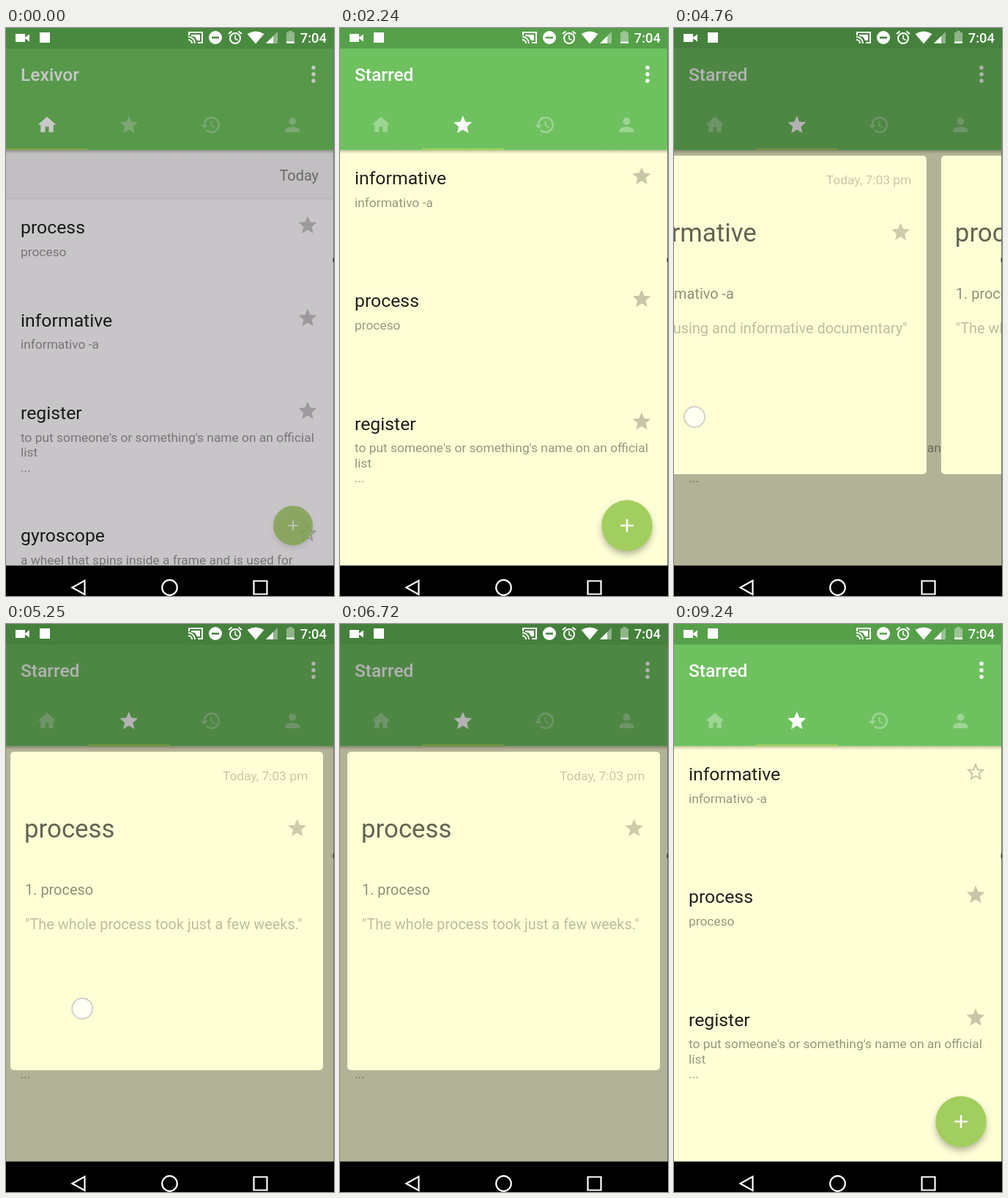
These frames come from a looping animation (448x774 px, 9.31 s). An HTML page with a canvas:

```html
<!DOCTYPE html>
<html lang="en">
<head>
<meta charset="utf-8">
<title>Dictionary app</title>
<style>
  html, body { margin: 0; width: 100%; height: 100%; overflow: hidden; background: #000; }
  canvas { display: block; }
</style>
</head>
<body>
<canvas id="stage" width="448" height="774"></canvas>
<script>
const ctx = document.getElementById('stage').getContext('2d');
const W = 448, LOOP = 9310, DP = 448 / 360, PITCH = 447;
const HEADER_END = 166.5, NAV_TOP = 732.5;
const YELLOW = '#ffffd6';
const start = performance.now();

const ICONS = {
  home: 'M10 20v-6h4v6h5v-8h3L12 3 2 12h3v8z',
  star: 'M12 17.27L18.18 21l-1.64-7.03L22 9.24l-7.19-.61L12 2 9.19 8.63 2 9.24l5.46 4.73L5.82 21z',
  starOutline: 'M22 9.24l-7.19-.62L12 2 9.19 8.63 2 9.24l5.46 4.73L5.82 21 12 17.27 18.18 21l-1.63-7.03zM12 15.4l-3.76 2.27 1-4.28-3.32-2.88 4.38-.38L12 6.1l1.71 4.04 4.38.38-3.32 2.88 1 4.28z',
  history: 'M13 3a9 9 0 0 0-9 9H1l3.89 3.89.07.14L9 12H6a7 7 0 1 1 2.06 4.94l-1.42 1.42A9 9 0 1 0 13 3zm-1 5v5l4.28 2.54.72-1.21-3.5-2.08V8z',
  person: 'M12 12a4 4 0 1 0 0-8 4 4 0 0 0 0 8zm0 2c-2.67 0-8 1.34-8 4v2h16v-2c0-2.66-5.33-4-8-4z'
};
for (const name in ICONS) ICONS[name] = new Path2D(ICONS[name]);

const WORDS = {
  process: {
    gloss: ['proceso'],
    card: [[369, '1. proceso'], [416, '"The whole process took just a few weeks."']]
  },
  informative: {
    gloss: ['informativo -a'],
    card: [[369, '1. informativo -a'], [416, '"an amusing and informative documentary"']]
  },
  register: {
    gloss: ["to put someone's or something's name on an official", 'list', '...'],
    card: [
      [369, "1. to put someone's or something's name on"], [392.5, 'an official list'],
      [439, '"The tanker is registered in Rotterdam."'],
      [504.5, '2. an official list of names of people,'], [528, 'companies etc, or a book that has this'],
      [575, '"Have you signed the hotel register?"']
    ]
  },
  gyroscope: { gloss: ['a wheel that spins inside a frame and is used for'] }
};

const clamp = x => Math.min(1, Math.max(0, x));
const progress = (t, from, to) => clamp((t - from) / (to - from));
const linear = x => x;
const out = x => 1 - (1 - x) ** 3;
const overshoot = x => 1 + (x - 1) ** 2 * (3 * (x - 1) + 2);

// Keys are [time, value, easing into this key].
function track(t, keys) {
  let last = keys[0];
  for (const key of keys) {
    if (t < key[0]) {
      const k = (key[2] || linear)(progress(t, last[0], key[0]));
      return last[1] + (key[1] - last[1]) * k;
    }
    last = key;
  }
  return last[1];
}

const TAB = [[450, 0], [600, .22], [1000, 1, out]];
const PAGER = [
  [4600, 0], [4760, .2], [5150, 1, out], [5230, 1], [5250, 1.007], [5350, 1.2], [5730, 2, out],
  [5890, 2], [6020, 1.738], [6090, 1.6], [6450, 1, out],
  [6800, 1], [6950, .72], [7080, .6], [7500, 0, out]
];
const DIM = [[0, .215], [220, 0], [3345, 0], [3620, .3], [8820, .3], [9100, 0]];
const FAB = [[0, .77], [80, 1, out], [3600, 1], [3808, 0], [8780, 0], [8980, 1, out]];
const TOUCHES = [
  [[3230, 121, 215], [3340, 121, 215]],
  [[4580, 128, 530], [4760, 28, 530]],
  [[5190, 128, 524], [5250, 105, 524], [5350, 28, 524]],
  [[5870, 36, 527], [6020, 173, 527], [6040, 176, 527]],
  [[6780, 36, 527], [6950, 173, 527], [7080, 230, 527]],
  [[8200, 402, 278], [8320, 402, 278]],
  [[8430, 223, 670], [8500, 223, 670]]
];

function text(str, x, y, size, color, { align = 'left', weight = 400 } = {}) {
  ctx.font = `${weight} ${size}px Roboto, sans-serif`;
  ctx.textAlign = align;
  ctx.fillStyle = color;
  ctx.fillText(str, x, y);
}

function rect(x, y, w, h, color) {
  ctx.fillStyle = color;
  ctx.fillRect(x, y, w, h);
}

function circle(x, y, r, color) {
  ctx.beginPath();
  ctx.arc(x, y, r, 0, 7);
  ctx.fillStyle = color;
  ctx.fill();
}

function polygon(points, color) {
  ctx.beginPath();
  points.forEach(p => ctx.lineTo(...p));
  ctx.closePath();
  ctx.fillStyle = color;
  ctx.fill();
}

function stroke(width, draw, color = '#fff') {
  ctx.beginPath();
  draw();
  ctx.strokeStyle = color;
  ctx.lineWidth = width;
  ctx.stroke();
}

function icon(name, x, y, color) {
  ctx.save();
  ctx.translate(x, y);
  ctx.scale(DP, DP);
  ctx.translate(-12, -12);
  ctx.fillStyle = color;
  ctx.fill(ICONS[name], 'evenodd');
  ctx.restore();
}

function shade(y, h, from, to) {
  const g = ctx.createLinearGradient(0, y, 0, y + h);
  g.addColorStop(0, `rgba(0,0,0,${from})`);
  g.addColorStop(1, `rgba(0,0,0,${to})`);
  rect(0, y, W, h, g);
}

function row(word, y, starred) {
  text(word, 20, y, 24.8, 'rgba(0,0,0,.88)');
  WORDS[word].gloss.forEach((line, i) =>
    text(line, 20, y + 30.8 + i * 20.4, 17.38, 'rgba(0,0,0,.41)'));
  icon(starred ? 'star' : 'starOutline', 412, y - 11.5, 'rgba(0,0,0,.22)');
}

function homePage() {
  rect(0, 166, W, 568, '#fffbff');
  rect(0, 166, W, 67, '#f7f3f7');
  shade(229, 5, 0, .06);
  text('Today', 427, 208, 16 * DP, 'rgba(0,0,0,.46)', { align: 'right' });
  row('process', 280, true);
  row('informative', 406.5, true);
  row('register', 533, true);
  row('gyroscope', 700, false);
}

function starredPage(t) {
  rect(0, 166, W, 568, YELLOW);
  row('informative', 213.2, t < 8800);
  row('process', 380.4, true);
  row('register', 547.6, true);
}

function shifted(x, draw) {
  if (Math.abs(x) >= W) return;
  ctx.save();
  ctx.translate(x, 0);
  draw();
  ctx.restore();
}

function header(tab) {
  shade(HEADER_END, 5, .22, 0);
  rect(0, 28, W, HEADER_END - 28, '#6fc160');
  text(tab < .5 ? 'Lexivor' : 'Starred', 20, 72, 24.6, '#fff', { weight: 500 });
  [54, 63, 72].forEach(y => circle(420, y, 2.7, '#fff'));
  ['home', 'star', 'history', 'person'].forEach((name, i) => {
    const alpha = .32 + .68 * clamp(1 - Math.abs(tab - i));
    icon(name, 56 + i * 111.8, 132, `rgba(255,255,255,${alpha})`);
  });
  rect(tab * 112, HEADER_END - 2.5, 112, 2.5, '#a3cf62');
}

function fab(scale) {
  if (scale <= 0) return;
  ctx.save();
  ctx.translate(392, 678);
  ctx.scale(scale, scale);
  ctx.globalAlpha = scale;
  ctx.shadowColor = `rgba(0,0,0,${.28 * scale ** 3})`;
  ctx.shadowBlur = 9 * scale;
  ctx.shadowOffsetY = 5 * scale;
  circle(0, 0, 34.7, '#a2ce5f');
  ctx.shadowColor = 'transparent';
  rect(-8.7, -1.25, 17.4, 2.5, '#fff');
  rect(-1.25, -8.7, 2.5, 17.4, '#fff');
  ctx.restore();
}

function card(word, starred) {
  ctx.beginPath();
  ctx.roundRect(10, 174, 427, 434, 5);
  ctx.fillStyle = YELLOW;
  ctx.fill();
  text('Today, 7:03 pm', 416.5, 213, 14 * DP, 'rgba(0,0,0,.22)', { align: 'right' });
  text(word, 29, 290.6, 28 * DP, 'rgba(0,0,0,.61)');
  icon(starred ? 'star' : 'starOutline', 401.7, 278, 'rgba(0,0,0,.2)');
  for (const [y, line] of WORDS[word].card)
    text(line, 30, y, 16 * DP, line[0] === '"' ? 'rgba(0,0,0,.26)' : 'rgba(0,0,0,.44)');
}

function dialog(t) {
  const scale = t < 6000
    ? overshoot(progress(t, 3345, 3920))
    : overshoot(1 - progress(t, 8500, 8800));
  if (scale <= 0) return;
  const page = track(t, PAGER);
  ctx.save();
  ctx.translate(223.5, 391);
  ctx.scale(scale, scale);
  ctx.translate(-223.5, -391);
  ['informative', 'process', 'register'].forEach((word, i) =>
    shifted((i - page) * PITCH, () => card(word, i > 0 || t < 8340)));
  ctx.restore();
}

function statusIcons(green) {
  const white = '#fff', faint = 'rgba(255,255,255,.4)';
  rect(13, 8, 13, 11, white);
  polygon([[25, 13.5], [32, 8.5], [32, 18.5]], white);
  rect(46, 6, 14, 14, white);

  stroke(2, () => {
    ctx.moveTo(250, 10); ctx.lineTo(250, 6); ctx.lineTo(268, 6);
    ctx.lineTo(268, 20); ctx.lineTo(262, 20);
  });
  [5, 9].forEach(r => stroke(2, () => ctx.arc(249, 21, r, -Math.PI / 2, 0)));
  polygon([[253, 9], [265, 9], [265, 17], [261, 17], [258, 12], [253, 11]], white);

  circle(286, 13, 9, white);
  rect(281, 11.8, 10, 2.6, green);

  stroke(2, () => ctx.arc(313, 14, 7, 0, 7));
  stroke(1.6, () => { ctx.moveTo(313, 9.5); ctx.lineTo(313, 14.5); ctx.lineTo(316.5, 16.5); });
  stroke(2, () => {
    ctx.moveTo(304, 8); ctx.lineTo(308.5, 4.5);
    ctx.moveTo(322, 8); ctx.lineTo(317.5, 4.5);
  });

  ctx.beginPath();
  ctx.moveTo(341, 21.5);
  ctx.lineTo(329.5, 8);
  ctx.quadraticCurveTo(341, 1, 352.5, 8);
  ctx.fillStyle = white;
  ctx.fill();

  polygon([[355, 21], [371, 21], [371, 5]], faint);
  polygon([[355, 21], [365, 21], [365, 11]], white);

  rect(386, 4, 5, 2, faint);
  rect(383, 6, 11, 15, faint);
  rect(383, 18.5, 11, 2.5, white);
  text('7:04', 438, 20.3, 18.4, white, { align: 'right', weight: 500 });
}

function navBar() {
  rect(0, NAV_TOP, W, 42, '#000');
  stroke(2.2, () => {
    ctx.moveTo(90.5, 762.5); ctx.lineTo(107.5, 753); ctx.lineTo(107.5, 772); ctx.closePath();
  });
  stroke(2.2, () => ctx.arc(223.5, 762.5, 10.3, 0, 7));
  stroke(2.2, () => ctx.rect(338.5, 753.5, 18, 18));
}

function touches(t) {
  for (const path of TOUCHES) {
    const end = path[path.length - 1][0];
    if (t < path[0][0] || t > end + 150) continue;
    const x = track(t, path);
    const y = path[0][2];
    ctx.globalAlpha = 1 - progress(t, end, end + 150);
    circle(x, y, 13.5, 'rgba(255,255,255,.68)');
    stroke(2, () => ctx.arc(x, y, 14, 0, 7), 'rgba(190,190,195,.7)');
    ctx.globalAlpha = 1;
  }
}

function draw(t) {
  const tab = track(t, TAB.map(key => key)), dim = track(t, DIM);
  shifted(-tab * W, homePage);
  shifted((1 - tab) * W, () => starredPage(t));
  header(tab);
  fab(track(t, FAB));
  rect(0, 28, W, 706, `rgba(0,0,0,${dim})`);

  const light = 1 - dim * .65;
  const green = `rgb(${[86, 160, 74].map(c => Math.round(c * light))})`;
  rect(0, 0, W, 28, green);
  dialog(t);
  statusIcons(green);
  rect(447, 28, 1, 705, '#777');
  rect(446.5, 313, 1.5, 6, 'rgba(0,0,0,.6)');
  navBar();
  touches(t);
}

// Touch paths carry a y coordinate in the easing slot, so only functions count as easings.
TOUCHES.forEach(path => path.forEach((p, i) => { if (i) p.length = 2; }));

function tick() {
  draw((performance.now() - start) % LOOP);
  requestAnimationFrame(tick);
}
tick();
</script>
</body>
</html>
```
